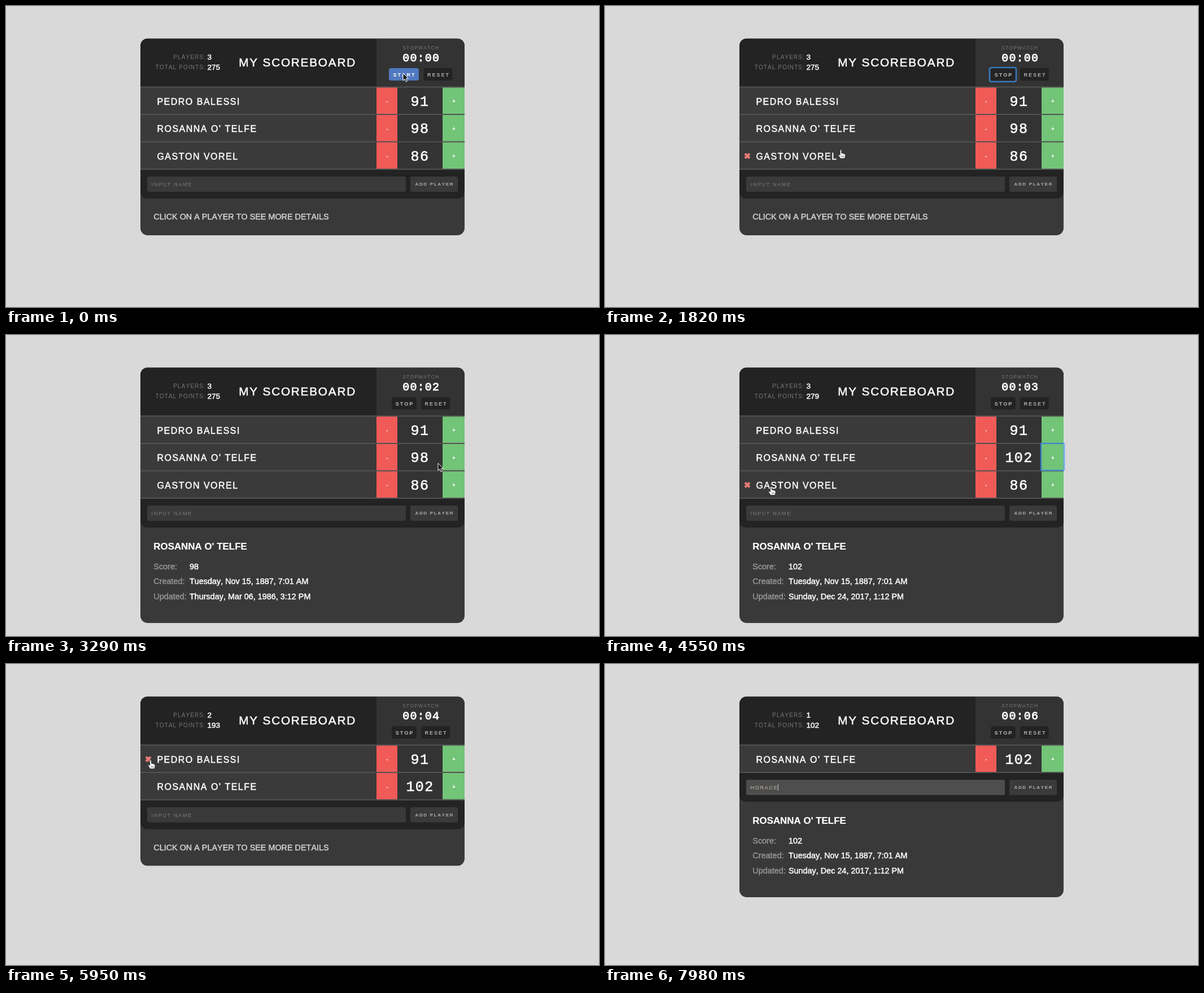
These frames come from a looping animation (1050x533 px, 8000 ms). An HTML page:

```html
<!DOCTYPE html>
<html lang="en">
<head>
<meta charset="utf-8">
<title>Scoreboard</title>
<style>
  html, body { margin: 0; width: 100%; height: 100%; overflow: hidden; background: #d9d9d9; }
  svg { display: block; width: 100vw; height: 100vh; }
  text {
    font-family: "Liberation Sans", Arial, sans-serif;
    font-kerning: none; white-space: pre;
    stroke: currentColor; stroke-width: 0;
  }
  .mono { font-family: "Liberation Mono", "Courier New", monospace; }
</style>
</head>
<body>
<svg id="stage" viewBox="0 0 1050 533"></svg>
<script>
const LOOP = 8000, STEP = 70;
const CARD = 57.5, TOP = 143, ROW = 48.5, LEFT = 238, RIGHT = 812;
const stage = document.getElementById('stage');

const people = [
  { name: 'PEDRO BALESSI', score: 91, gone: 6230 },
  { name: "ROSANNA O' TELFE", score: 98, gone: Infinity,
    created: 'Tuesday, Nov 15, 1887, 7:01 AM', updated: 'Thursday, Mar 06, 1986, 3:12 PM' },
  { name: 'GASTON VOREL', score: 86, gone: 5200,
    created: 'Saturday, Nov 14, 1840, 9:16 AM', updated: 'Sunday, Dec 05, 1926, 6:28 PM' }
];
const START = 980, FIRST_PLUS = 3570, PLUS_GAP = 140, FOCUS = 7000, TYPING = 7280, KEY_GAP = 120;
const selections = [[0, -1], [2100, 2], [2830, 1], [5200, -1], [6510, 1]];

// Pointer stops: time, x, y
const stops = [
  [0, 703, 120], [420, 703, 120], [840, 690, 124], [1150, 689, 124], [2000, 382, 272],
  [2450, 382, 272], [2760, 400, 218], [2900, 400, 218], [3290, 765, 228], [3490, 790, 217],
  [4130, 790, 217], [4550, 294, 268.5], [4900, 254, 265], [5300, 254, 265], [5880, 256, 170.5],
  [6260, 256, 170.5], [6460, 330, 170], [6600, 330, 170], [6950, 345, 216]
];

const clamp = (v, a, b) => Math.min(b, Math.max(a, v));
const esc = s => String(s).replace(/&/g, '&amp;').replace(/</g, '&lt;');

function pointerAt(t) {
  const i = stops.findIndex(s => s[0] > t);
  if (i < 0) return stops[stops.length - 1].slice(1);
  const [t0, x0, y0] = stops[i - 1], [t1, x1, y1] = stops[i];
  const u = (t - t0) / (t1 - t0), e = u * u * (3 - 2 * u);
  return [x0 + (x1 - x0) * e, y0 + (y1 - y0) * e];
}

function text(x, y, str, size, fill, o = {}) {
  return `<text x="${x}" y="${y}" font-size="${size}" fill="${fill}" color="${fill}"` +
    ` letter-spacing="${o.ls || 0}" text-anchor="${o.anchor || 'start'}"` +
    ` font-weight="${o.bold ? 700 : 400}" style="stroke-width:${o.heavy || 0}"` +
    `${o.mono ? ' class="mono"' : ''}>${esc(str)}</text>`;
}

function rect(x, y, w, h, fill, r = 0, extra = '') {
  return `<rect x="${x}" y="${y}" width="${w}" height="${h}" rx="${r}" fill="${fill}" ${extra}/>`;
}

const inside = (p, x, y, w, h) => p[0] >= x && p[0] < x + w && p[1] >= y && p[1] < y + h;

// Translucent, so it reads dark over the card and light over the page
function ring(x, y, w, h, r) {
  return rect(x, y, w, h, 'none', r, 'stroke="#3b99fc" stroke-width="2.6" opacity=".68"');
}

function header(s) {
  const { t, p, list } = s;
  const running = t >= START;
  const total = list.reduce((sum, q) => sum + q.points, 0);
  const [bx, bw, rx, rw] = running ? [683, 44, 735, 51] : [678, 53, 739.5, 51];
  const hot = inside(p, bx, 110, bw, 22);
  const secs = running ? Math.max(0, Math.floor((t - 990) / 1000)) : 0;
  const label = { ls: 1.1, anchor: 'end' };
  let out = rect(LEFT, CARD, 418, TOP - CARD, '#232323') + rect(656, CARD, 156, TOP - CARD, '#333');
  out += text(354, 94.3, 'PLAYERS:', 10, '#777', label) + text(354, 112.3, 'TOTAL POINTS:', 10, '#777', label);
  out += text(356.5, 94.7, list.length, 13.6, '#fff', { heavy: .5 });
  out += text(356.5, 112.7, total, 13.6, '#fff', { heavy: .5 });
  out += text(412.3, 106.6, 'MY SCOREBOARD', 20.8, '#fff', { ls: 1.75, heavy: .55 });
  out += text(734.6, 77.3, 'STOPWATCH', 8.5, '#777', { ls: 1.15, anchor: 'middle' });
  out += text(735.2, 98.3, '00:0' + secs, 20, '#fff', { ls: 1.2, anchor: 'middle', mono: true, heavy: .9 });
  out += rect(bx, 110, bw, 22, hot ? '#5079bf' : '#232323', 4);
  if (running && t < 2100) out += ring(bx - 2, 109, bw + 3, 25, 3);
  const btn = { ls: 2, anchor: 'middle', bold: true };
  out += text(bx + bw / 2 + 1, 124.7, running ? 'STOP' : 'START', 9, hot ? '#fff' : '#bbb', btn);
  out += rect(rx, 110, rw, 22, '#232323', 4);
  out += text(rx + rw / 2 + 1, 124.7, 'RESET', 9, '#aaa', btn);
  return out;
}

const divider = y => rect(LEFT, y - .5, 574, 2, '#525252');

function row(s, q, i) {
  const y = TOP + ROW * i;
  const sign = { anchor: 'middle', bold: true };
  let out = rect(LEFT, y, 574, ROW, '#3a3a3a') + rect(693, y, 80, ROW, '#333');
  out += rect(656, y, 37, ROW, '#f05b58') + rect(773, y, 39, ROW, '#72c477');
  out += divider(y);
  if (inside(s.p, LEFT, y, 418, ROW))
    out += `<path d="M248 ${y + 21.5}l8 8m0-8l-8 8" stroke="#e87a76" stroke-width="4.2"/>`;
  out += text(267.4, y + 31.6, q.name, 16, '#fff', { ls: 1.5, heavy: .5 });
  out += text(675, y + 29, '-', 10, '#fff', sign) + text(793, y + 29, '+', 10, '#fff', sign);
  out += text(733, y + 33.5, q.points, 25, '#fff', { ls: 1.4, anchor: 'middle', mono: true, heavy: .6 });
  return out;
}

function form(s) {
  const { t, f } = s;
  const typed = 'HORACE'.slice(0, clamp(Math.floor((t - TYPING) / KEY_GAP) + 1, 0, 6));
  const focused = t >= FOCUS;
  let out = `<path d="M${LEFT} ${f}H${RIGHT}V${f + 39}q0 13.5-13.5 13.5H${LEFT + 13.5}q-13.5 0-13.5-13.5z" fill="#232323"/>`;
  out += divider(f);
  out += rect(250, f + 13.5, 458, 27, focused ? '#4e4e4e' : '#3a3a3a', 3);
  out += `<g id="field">${text(257.6, f + 30.7, typed || 'INPUT NAME', 9.3, typed ? '#c4b8ac' : '#7c7c7c', { ls: 1.5 })}</g>`;
  out += rect(716, f + 13.5, 84, 27, '#3a3a3a', 3);
  out += text(758.8, f + 29.8, 'ADD PLAYER', 8, '#b0b0b0', { ls: 1.67, anchor: 'middle', bold: true });
  return out;
}

function details(s) {
  const { f, chosen } = s;
  if (!chosen) return text(261.3, f + 89.7, 'CLICK ON A PLAYER TO SEE MORE DETAILS', 14.4, '#d6d6d6', { heavy: .45 });
  const lines = [['Score:', chosen.points], ['Created:', chosen.created], ['Updated:', chosen.edited]];
  return text(261.3, f + 91.8, chosen.name, 16.9, '#fff', { bold: true, heavy: .2 }) +
    lines.map(([k, v], i) => {
      const y = f + 126.4 + 26.3 * i;
      return text(261.3, y, k, 14.4, '#999', { heavy: .35 }) + text(325, y, v, 14.4, '#fff', { heavy: .5 });
    }).join('');
}

function pointer(s) {
  const { t, p, list, f } = s;
  if (t >= TYPING) return '';
  const overButton = inside(p, 678, 110, 112, 22);
  const overRow = inside(p, LEFT, TOP, 418, ROW * list.length);
  const overSign = inside(p, 773, TOP, 39, ROW * list.length);
  const at = `transform="translate(${p[0].toFixed(1)} ${p[1].toFixed(1)})"`;
  if (inside(p, 250, f + 13.5, 458, 27))
    return `<path ${at} d="M-3-7q3 0 3 2v10q0 2-3 2m6-14q-3 0-3 2m0 10q0 2 3 2" fill="none" stroke="#ddd" stroke-width="1.2"/>`;
  if (t >= 140 && (overButton || overRow || overSign))
    return `<path ${at} d="M-1.4 1q0-1.4 1.4-1.4T1.4 1V5.5q2-.8 2.4.8q1.7-.6 2.3.8q2-.2 2 1.6v2.6l-1.2 3.9H-.8q-1-2.3-3.2-5q-1-1.6.2-2.1q1.2-.3 2.4 1.4z" fill="#fff" stroke="#222" stroke-width=".9"/>` +
      `<path ${at} d="M1.4 10v3m2-3v3m2-3v3" stroke="#333" stroke-width=".7"/>`;
  return `<path ${at} d="M0-1V12l3-2.8 2.1 4.9 2.3-1-2.1-4.8h4z" fill="#111" stroke="#fff" stroke-width="1"/>`;
}

function draw(t) {
  const plus = clamp(Math.floor((t - FIRST_PLUS) / PLUS_GAP) + 1, 0, 4);
  const all = people.map((q, i) => ({
    ...q,
    points: q.score + (i === 1 ? plus : 0),
    edited: i === 1 && plus ? 'Sunday, Dec 24, 2017, 1:12 PM' : q.updated
  }));
  const list = all.filter(q => t < q.gone);
  const pick = selections.filter(e => e[0] <= t).pop()[1];
  const f = TOP + ROW * list.length;
  const s = { t, list, f, chosen: all[pick], p: pointerAt(t) };
  const height = f + (s.chosen ? 221.5 : 117.5) - CARD;

  stage.innerHTML =
    `<clipPath id="card">${rect(LEFT, CARD, 574, height, '#000', 13)}</clipPath>` +
    rect(0, 0, 1050, 533, '#d9d9d9') +
    `<g clip-path="url(#card)">${rect(LEFT, CARD, 574, height, '#393939')}` +
    header(s) + list.map((q, i) => row(s, q, i)).join('') + form(s) + details(s) + '</g>' +
    (plus && t < 5130 ? ring(772, TOP + ROW + .5, 41, ROW - 1, 1) : '') +
    pointer(s);

  if (t >= FOCUS) {
    const x = t < TYPING ? 258 : 257.6 + stage.querySelector('#field text').getComputedTextLength();
    stage.insertAdjacentHTML('beforeend', rect(x - .5, f + 21.5, 1, 11, '#ccc'));
  }
}

let shown = -1;
const began = performance.now();
function tick(now) {
  const t = Math.floor((Math.max(0, now - began) % LOOP) / STEP) * STEP;
  if (t !== shown) draw(shown = t);
  requestAnimationFrame(tick);
}
draw(0);
requestAnimationFrame(tick);
</script>
</body>
</html>
```
